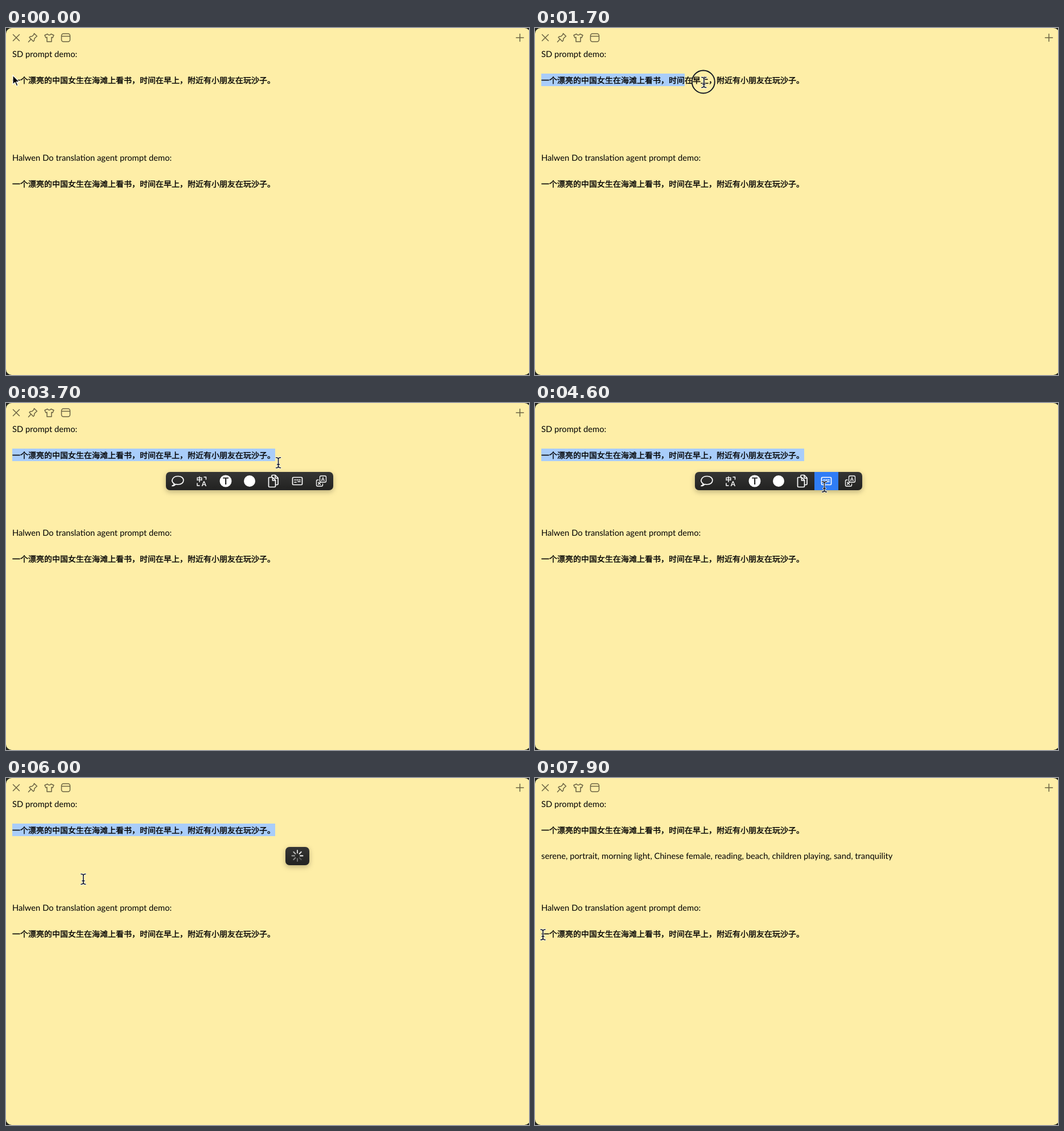
Animation of 919x609 px, one loop 8 s. Source, as an HTML page:

```html
<!DOCTYPE html>
<html lang="en">
<head>
<meta charset="utf-8">
<title>Prompt demo</title>
<style>
html, body { margin: 0; width: 100%; height: 100%; overflow: hidden; background: #25251f; }
svg { display: block; }
text { font: 14.75px Lato, sans-serif; fill: #000; text-rendering: geometricPrecision; }
.zh { font: 500 14px "Noto Sans CJK SC", "Noto Sans CJK", sans-serif; stroke: #000; stroke-width: 0.4; }
.line { fill: none; stroke-linecap: round; stroke-linejoin: round; }
#controls { stroke: #6b6343; stroke-width: 1.5; }
#popup, #loader { filter: drop-shadow(0 3px 5px #0004); }
#icons { stroke: #fff; stroke-width: 1.7; }
#icons text { fill: #fff; stroke: none; text-anchor: middle; font-weight: bold; }
#ring { fill: none; stroke: #101522; stroke-width: 1.9; }
</style>
</head>
<body>
<svg width="919" height="609" viewBox="0 0 919 609">
  <defs>
    <linearGradient id="dark" x2="0" y2="1">
      <stop stop-color="#353534"/><stop offset="1" stop-color="#222221"/>
    </linearGradient>
    <path id="beam" d="M-4 -9Q0 -9 0 -6Q0 -9 4 -9M0 -7V7M-4 9Q0 9 0 6Q0 9 4 9M-2 3H2"/>
  </defs>
  <rect width="921" height="609" rx="10" fill="#feeea7"/>

  <g id="controls" class="line">
    <path d="M12.5 11.5l11 11m0 -11l-11 11"/>
    <path d="M49.5 9.5l5 5 -1.5 1 -3 3 -.5 3.5 -1.5 1.5 -7 -7 1.5 -1.5 3.5 -.5 3 -3zM43.5 20l-4 4.5"/>
    <path d="M73 10.5C74 13 78 13 79 10.5L84 12.7 82 17 80 16.3V24H72V16.3L70 17 68 12.7Z"/>
    <rect x="97.5" y="10" width="15" height="14" rx="3.5"/>
    <path d="M98 14.5h14M896.5 17h13m-6.5 -6.5v13"/>
  </g>

  <rect id="selection" x="11" y="80" height="22" fill="#a9cdfa"/>
  <text x="11" y="51">SD prompt demo:</text>
  <text x="11" y="97" class="zh">一个漂亮的中国女生在海滩上看书，时间在早上，附近有小朋友在玩沙子。</text>
  <text x="11" y="142" id="answer">serene, portrait, morning light, Chinese female, reading, beach, children playing, sand, tranquility</text>
  <text x="11" y="233">Halwen Do translation agent prompt demo:</text>
  <text x="11" y="279" class="zh">一个漂亮的中国女生在海滩上看书，时间在早上，附近有小朋友在玩沙子。</text>

  <g id="popup">
    <rect x="281" y="121" width="294" height="32" rx="7" fill="url(#dark)"/>
    <rect id="hover" y="121" width="42" height="32" fill="#2f7df6"/>
    <g id="icons" class="line">
      <path d="M296 142C288 137 293 128.500 302.500 128.500C315 128.500 315 143 302.500 143Q300 143 298 142.500Q296 145.500 292 145.500Q295 144 296 142Z"/>
      <text x="340" y="138" class="zh" style="font-size:11px">中</text>
      <text x="348" y="146" style="font-size:12px">A</text>
      <path d="M348 130h3.500v4M336 141v4h4" stroke-width="1.500"/>
      <circle cx="386" cy="137" r="10.500" fill="#fff" stroke="none"/>
      <text x="386" y="143" style="font-size:17px;fill:#2a2a2a">T</text>
      <circle cx="428" cy="137" r="10" fill="#fff" stroke="none"/>
      <path d="M467 130.500V128q0 -1.500 1.500 -1.500h4.500l5 5V142q0 1.500 -1.500 1.500H474M473 127v5h5M463.500 130.500h5l5 5V146q0 1.500 -1.500 1.500H463q-1.500 0 -1.500 -1.500V132q0 -1.500 2 -1.500M468.500 131v5h5"/>
      <path d="M505 143.500q-1.500 0 -1.500 -1.500v-10q0 -1.500 1.500 -1.500h14q1.500 0 1.500 1.500v10q0 1.500 -1.500 1.500zM507 135h2m2 0h2m2 0h2M507 139h3m3 -1h4"/>
      <g stroke-width="1.300">
        <rect x="551.500" y="128" width="11" height="11" rx="2"/>
        <path d="M549 135h-1.500q-2 0 -2 2v7q0 2 2 2h7q2 0 2 -2v-2M548.500 139l4 4m0 -4l-4 4"/>
      </g>
      <text x="557" y="137" style="font-size:9px">A</text>
    </g>
  </g>

  <g id="loader">
    <rect x="491" y="121" width="42" height="32" rx="7" fill="url(#dark)"/>
    <g id="spokes" transform="translate(512 136.500)" stroke="#fff" stroke-width="2" stroke-linecap="round"></g>
  </g>

  <g id="cursor">
    <circle id="ring" cx="-1" cy="-1" r="20"/>
    <path id="arrow" d="M0 0V16L3.800 12.600 6.500 18.800 9 17.700 6.400 11.600H11.500Z" stroke="#fff" stroke-width="1.200"/>
    <g id="ibeam" class="line">
      <use href="#beam" stroke="#fff" stroke-width="3"/>
      <use href="#beam" stroke="#111522" stroke-width="1.600"/>
    </g>
  </g>
</svg>
<script>
const LOOP = 8000, STEP = 100;
const $ = id => document.getElementById(id);
const show = (id, on) => $(id).style.display = on ? '' : 'none';
const within = (v, from, to) => v >= from && v < to;

// Pointer stops: time, x, y
const stops = [
  [0, 12, 83], [400, 12, 83], [600, 14, 93], [700, 14, 93], [2430, 473, 97],
  [3500, 473, 97], [4300, 508.5, 147], [5000, 508.5, 147], [5400, 131, 132],
  [5600, 131, 132], [6300, 139, 207], [6800, 139, 207], [7500, 24, 274],
  [7700, 14, 275], [LOOP, 14, 275]
];

function pointer(t) {
  const i = stops.findIndex(s => s[0] > t);
  const [t0, x0, y0] = stops[i - 1], [t1, x1, y1] = stops[i];
  const u = (t - t0) / (t1 - t0), k = u * u * (3 - 2 * u);
  return [x0 + (x1 - x0) * k, y0 + (y1 - y0) * k];
}

const spokes = Array.from({ length: 8 }, (_, i) => {
  const spoke = document.createElementNS('http://www.w3.org/2000/svg', 'path');
  spoke.setAttribute('d', 'M5 0H9.5');
  spoke.setAttribute('transform', `rotate(${i * 45})`);
  return $('spokes').appendChild(spoke);
});

function draw(t) {
  const [x, y] = pointer(t);
  const popup = within(t, 3100, 4900), loading = within(t, 4900, 6100);
  const left = loading ? 491 : 281, right = loading ? 533 : 575;
  const inside = (popup || loading) && within(x, left, right) && within(y, 121, 153);

  // The selection trails the pointer and snaps to whole characters
  const chars = within(t, 700, 6100)
    ? Math.min(33, Math.round((pointer(Math.min(t, 2700) - 100)[0] - 11) / 14)) : 0;
  $('selection').setAttribute('width', chars * 14);

  show('controls', !inside);
  show('answer', t >= 6100);
  show('popup', popup);
  show('hover', inside);
  $('hover').setAttribute('x', 281 + Math.floor((x - 281) / 42) * 42);
  show('loader', loading);
  const head = t / STEP + 4;
  spokes.forEach((s, i) => s.setAttribute('opacity', 1 - ((head - i) % 8) * 0.11));

  $('cursor').setAttribute('transform', `translate(${x} ${y})`);
  show('arrow', t < 500);
  show('ibeam', t >= 500);
  show('ring', within(t, 700, 3000) || within(t, 4700, 4900));
}

const start = performance.now();
function tick() {
  const t = (performance.now() - start) % LOOP;
  draw(Math.floor(t / STEP) * STEP);
  requestAnimationFrame(tick);
}
tick();
</script>
</body>
</html>
```
